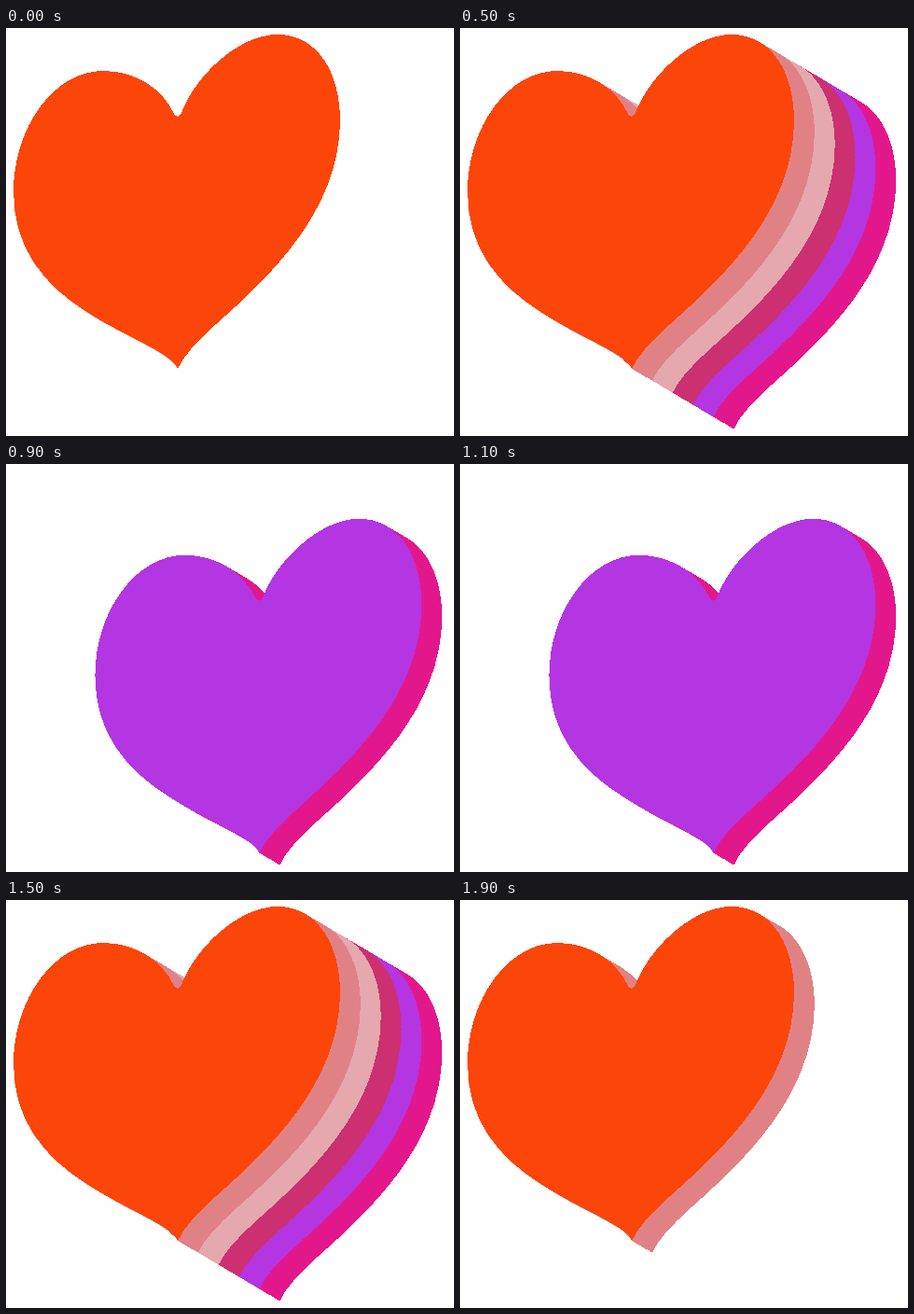
Recreate the animation shown at these times as an HTML page. Size 480 by 438 pixels, loop 2000 ms.

```html
<!DOCTYPE html>
<html lang="en">
<head>
<meta charset="utf-8">
<title>Layered heart</title>
<style>
  html, body { margin: 0; width: 100%; height: 100%; overflow: hidden; background: #fff; }
  svg { display: block; }
</style>
</head>
<body>
<svg width="480" height="438" shape-rendering="crispEdges">
  <!-- Keeps the sides of the stack from showing below the front face's lower left edge. -->
  <clipPath id="visible"><path id="cut" shape-rendering="crispEdges"/></clipPath>
  <g id="stack" clip-path="url(#visible)"></g>
</svg>
<script>
const STEP_MS = 100, STEPS = 20;
const COLORS = ['#fc4509', '#e08285', '#e5a8ae', '#cc3070', '#b435e2', '#e3178c'];
const BACK = COLORS.length - 1;
const SHIFT = { x: 21.85, y: 12.95 }; // distance between neighbouring layers
const SLICES = 24;                    // copies that make up one layer's side

const HEART = `M8 176
  C8 106 52 46 104 46 C140 46 168 66 180 92
  C182 96 186 96 188 91 C202 53 248 7 291 7
  C334 7 358 48 358 100 C357 198 281 268 225 318
  C205 336 190 352 184 366
  C177 349 130 333 88 306 C40 276 8 236 8 176Z`;
const CUT = `M8 176 C8 236 40 276 88 306 C130 333 177 349 184 366
  l${SHIFT.x * BACK * 2} ${SHIFT.y * BACK * 2} H900 V-100 H-100 V176Z`;

const cut = document.getElementById('cut');
const stack = document.getElementById('stack');
const offset = depth => `translate(${depth * SHIFT.x} ${depth * SHIFT.y})`;

function addSlice(depth) {
  const path = document.createElementNS('http://www.w3.org/2000/svg', 'path');
  path.setAttribute('d', HEART);
  path.setAttribute('fill', COLORS[Math.ceil(depth)]);
  path.setAttribute('transform', offset(depth));
  stack.append(path);
  return { path, depth };
}

cut.setAttribute('d', CUT);
const slices = [];
for (let i = BACK * SLICES; i >= 0; i--) slices.push(addSlice(i / SLICES));

function draw(step) {
  // Layers grow backwards, peel off from the front, then do the reverse.
  const first = Math.max(0, BACK - Math.abs(step - STEPS / 2));
  const last = Math.min(BACK, step, STEPS - step);
  cut.setAttribute('transform', offset(first));
  for (const { path, depth } of slices) {
    path.style.display = depth >= first && depth <= last ? '' : 'none';
  }
}

const start = performance.now();
let shown = -1;
function tick() {
  const step = Math.floor((performance.now() - start) / STEP_MS) % STEPS;
  if (step !== shown) draw(shown = step);
  requestAnimationFrame(tick);
}
tick();
</script>
</body>
</html>
```
